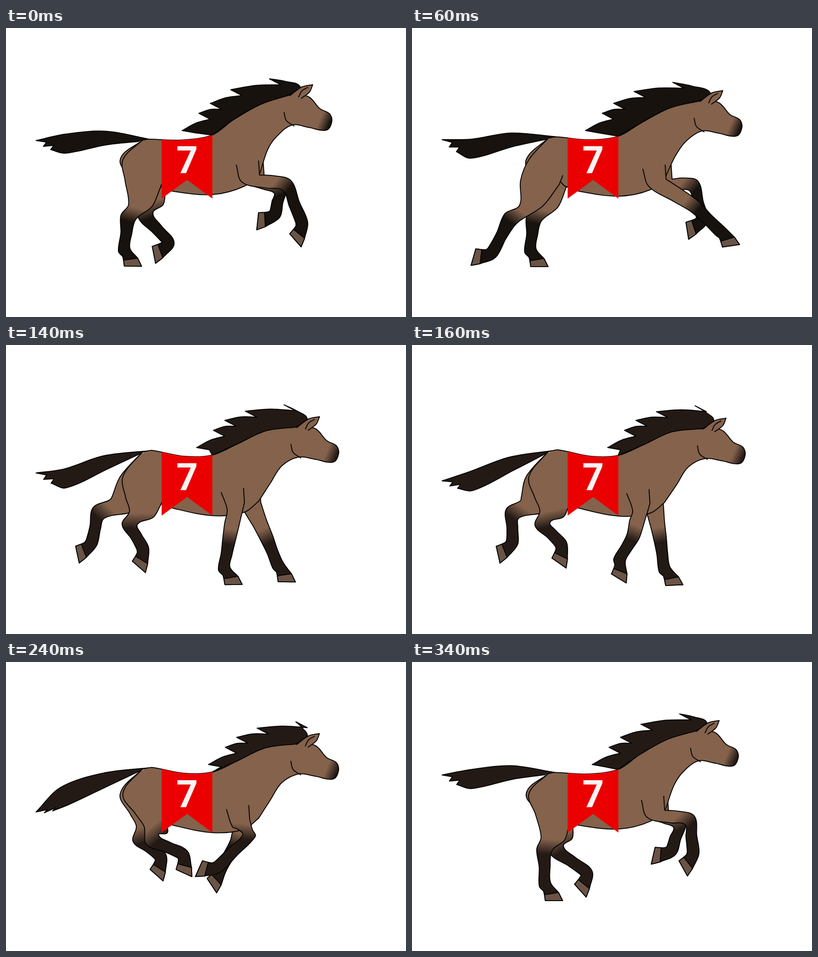
These frames come from a looping animation (879x637 px, 360 ms). An HTML page with a canvas:

```html
<!DOCTYPE html>
<html lang="en">
<head>
<meta charset="utf-8">
<title>Galloping horse</title>
<style>
  html, body { margin: 0; width: 100%; height: 100%; overflow: hidden; background: #fff; }
  canvas { display: block; }
</style>
</head>
<body>
<canvas id="stage" width="879" height="637"></canvas>
<script>
const ctx = document.getElementById('stage').getContext('2d');
const LOOP = 360, STEP = 20;
const COAT = '#84624c', HOOF = '#6a5446', LINE = '#050403';

// Key poses of the rig. Head: offset from rest. Tail: height of bend and tip.
// Legs: knee x, y, sole x, y and sole angle in degrees.
const poses = [
  { time: 0, head: [0, 0], tail: [255, 248],
    nearFore: [617, 347, 636, 468, 49], farFore: [602, 358, 553, 426, 96],
    nearHind: [269, 417, 279, 525, 1], farHind: [307, 413, 325, 500, 79] },
  { time: 60, head: [9, 13], tail: [266, 246],
    nearFore: [622, 394, 701, 480, -8], farFore: [619, 348, 605, 447, 81],
    nearHind: [218, 419, 135, 505, 106], farHind: [268, 421, 280, 526, 0] },
  { time: 100, head: [11, 23], tail: [274, 249],
    nearFore: [547, 425, 567, 522, 10], farFore: [604, 392, 655, 488, 1],
    nearHind: [247, 393, 217, 495, 84], farHind: [218, 398, 163, 508, 67] },
  { time: 140, head: [15, 33], tail: [294, 282],
    nearFore: [490, 430, 500, 528, -1], farFore: [574, 428, 617, 522, 1],
    nearHind: [272, 395, 292, 489, 41], farHind: [204, 370, 157, 462, 78] },
  { time: 200, head: [17, 39], tail: [305, 327],
    nearFore: [500, 399, 386, 480, 104], farFore: [495, 410, 494, 528, 1],
    nearHind: [313, 392, 371, 465, 33], farHind: [267, 384, 271, 475, 68] },
  { time: 280, head: [11, 23], tail: [280, 318],
    nearFore: [572, 368, 493, 440, 103], farFore: [535, 388, 441, 453, 111],
    nearHind: [321, 395, 389, 476, 15], farHind: [315, 397, 374, 468, 20] },
  { time: 340, head: [1, 4], tail: [258, 249],
    nearFore: [610, 349, 596, 455, 61], farFore: [588, 360, 530, 427, 103],
    nearHind: [291, 414, 312, 526, 0], farHind: [318, 414, 370, 504, 48] }
];

// Body outline at rest: x, y, share of the head's vertical and horizontal motion.
const BODY = [
  [300, 247, -.36, .2], [314, 245, -.38, .5], [385, 247, -.05, .5], [453, 236, .2, 0],
  [500, 202, .5], [560, 168, .65], [622, 148, 1], [664, 151, 1], [690, 178, 1],
  [711, 189, 1], [716, 206, 1], [704, 225, 1], [665, 219, 1], [628, 214, 1],
  [594, 240, .8], [575, 268, 1.1, .4], [558, 320, .75, -.2], [523, 349, .6, 0],
  [455, 367, .28, 0], [368, 360, 0], [335, 348, 0], [290, 300, 0]
];

const shift = (p, x, y) => [p[0] + x, p[1] + y];
const mix = (a, b, k) => [a[0] + (b[0] - a[0]) * k, a[1] + (b[1] - a[1]) * k];
const unit = (a, b) => {
  const x = b[0] - a[0], y = b[1] - a[1], length = Math.hypot(x, y) || 1;
  return [x / length, y / length];
};

// Two points either side of b, square to the bend a-b-c.
function across(a, b, c, half) {
  const [x, y] = unit([0, 0], shift(unit(a, b), ...unit(b, c)));
  return [shift(b, y * half, -x * half), shift(b, -y * half, x * half)];
}

// Cubic interpolation of one track through the looping key poses.
function sample(track, t) {
  const n = poses.length, k = poses.findLastIndex(p => p.time <= t);
  const keys = [-1, 0, 1, 2].map(d => poses[(k + d + n) % n][track]);
  const [ta, tb, tc, td] = [-1, 0, 1, 2].map(d => poses[(k + d + n) % n].time + Math.floor((k + d) / n) * LOOP);
  const span = tc - tb, u = (t - tb) / span;
  return keys[1].map((p, i) => {
    const [a, , c, d] = keys.map(key => key[i]);
    const m0 = (c - a) / (tc - ta) * span, m1 = (d - p) / (td - tb) * span;
    return p + u * (m0 + u * (3 * (c - p) - 2 * m0 - m1 + u * (2 * (p - c) + m0 + m1)));
  });
}

// Smooth open curve through points; corners keep straight tangents.
function curve(points, corners = [], from = 0, to = points.length - 1) {
  const path = new Path2D();
  const handle = (i, toward) => {
    const p = points[i], q = points[toward];
    const before = corners.includes(i) ? p : points[2 * i - toward] || p;
    const reach = Math.hypot(q[0] - p[0], q[1] - p[1]) / 3;
    const [x, y] = unit(before, q);
    return shift(p, x * reach, y * reach);
  };
  path.moveTo(...points[from]);
  for (let i = from; i < to; i++)
    path.bezierCurveTo(...handle(i, i + 1), ...handle(i + 1, i), ...points[i + 1]);
  return path;
}

function paint(path, fill) {
  ctx.fillStyle = fill;
  ctx.fill(path);
  ctx.stroke(path);
}

function fade(a, b, dark) {
  const g = ctx.createLinearGradient(...a, ...b);
  g.addColorStop(0, COAT);
  g.addColorStop(1, dark);
  return g;
}

// Upper limbs: where the leg meets the body follows the knee.
function shoulder(knee, drop, far) {
  const joint = [504 + (knee[0] - 490) * .26 + far * 14, 330 + drop * .7];
  return {
    joint, half: 14,
    front: [shift(joint, 18, -37), shift(joint, 20, -6)],
    back: [shift(joint, -18, 10), shift(joint, -31, -28)],
    middle: foot => across(joint, mix(joint, knee, .55), foot, 16)
  };
}

function haunch(knee, drop, far) {
  const swing = knee[0] - 270;
  const flank = [339 + swing * .3, 353 + swing * .15];
  return {
    joint: [300 + swing * .2, 340], half: 17,
    front: [shift(flank, 8, -20), flank],
    back: [[262 + swing * .45, 336], [257 - far * 6, 290], [300, 247 - drop * .36]],
    middle: (foot, kneeFront) => [shift(mix(flank, kneeFront, .5), 9, 6), [270 + swing * .65, knee[1] - 28]]
  };
}

function drawLeg([kx, ky, sx, sy, angle], limb, drop, far, dark) {
  const knee = [kx, ky], a = angle * Math.PI / 180;
  const c = Math.cos(a), s = Math.sin(a);
  const onFoot = (along, up) => [sx + along * c + up * s, sy + along * s - up * c];
  const fetlock = onFoot(-20, 36);
  const hoof = [onFoot(10, 18), onFoot(19, 0), onFoot(-19, 0), onFoot(-21, 13)];
  const top = limb(knee, drop, far);

  const [kneeFront, kneeBack] = across(top.joint, knee, fetlock, top.half);
  const [shinFront, shinBack] = across(knee, mix(knee, fetlock, .5), fetlock, 12);
  const [ankleFront, ankleBack] = across(knee, fetlock, onFoot(-5, 16), 13);
  const [upperFront, upperBack] = top.middle(fetlock, kneeFront);
  const outline = [
    ...top.front, upperFront, kneeFront, shinFront, ankleFront,
    ...hoof, onFoot(-23, 21), ankleBack, shinBack, kneeBack, upperBack, ...top.back
  ];
  const corners = [1, 6, 7, 8, 9, 10];

  const [x, y] = unit(kneeFront, kneeBack);
  ctx.fillStyle = fade(shift(knee, -y * 22, x * 22).map((v, i) => 2 * knee[i] - v),
                       shift(knee, y * 10, -x * 10).map((v, i) => v), dark);
  ctx.fillStyle = fade(shift(knee, -y * 24, x * 24), shift(knee, y * 9, -x * 9), dark);
  const path = curve(outline, corners);
  ctx.fill(path);
  ctx.fillStyle = dark;
  ctx.fill(curve(outline, corners, 4, 12));
  ctx.stroke(path);
  paint(curve([...hoof, hoof[0]], [0, 1, 2, 3, 4]), HOOF);
}

function drawTail(root, [bendY, tipY], dark) {
  const tip = [66, tipY], bend = [130, bendY];
  const start = [220, root[1] * .45 + bendY * .55 - 8];
  const [startLow, startTop] = across(root, start, bend, 15);
  const [bendLow, bendTop] = across(start, bend, tip, 21);
  const outline = [root, startTop, bendTop, tip];
  for (const k of [.25, .5])
    outline.push(shift(mix(tip, bendLow, k - .05), 10, -2), shift(mix(tip, bendLow, k), 0, 6));
  outline.push(bendLow, startLow, shift(root, -22, 5));
  paint(curve(outline, [3, 4, 5, 6, 7]), dark);
}

// Five locks sway back and forth; each ends in a point with a notch below it.
function drawMane(crest, ear, drop, t, dark) {
  const sway = 34 * Math.cos((t - 40) / LOOP * 2 * Math.PI);
  const outline = [...crest, shift(ear, -27, 6)], corners = [3];
  let notch = outline[4];
  [[605, 112], [520, 136], [475, 166], [450, 188], [413, 226]].forEach(([x, y], i) => {
    const tip = [x - sway, y + drop * Math.max(0, .6 - i * .3)];
    outline.push(shift(mix(notch, tip, .5), 0, -4), tip);
    notch = shift(tip, 25, 13);
    if (i === 4) notch = shift(tip, 28, 5);
    corners.push(outline.length - 1, outline.length);
    outline.push(notch);
  });
  paint(curve([...outline, crest[0]], corners), dark);
}

function drawFlag(body) {
  ctx.save();
  const area = new Path2D(body);
  area.rect(340, 300, 116, 80);
  ctx.clip(area);
  ctx.fillStyle = '#ea0000';
  ctx.fill(new Path2D('M342 200H453.5V376L398 335L342 376Z'));
  ctx.restore();
  ctx.fillStyle = '#f8f4f4';
  ctx.font = 'bold 83px Roboto, "Open Sans", sans-serif';
  ctx.textAlign = 'center';
  ctx.fillText('7', 398, 320);
}

function draw(t) {
  const dark = t < 80 ? '#17120e' : '#231a16';
  const [dx, dy] = sample('head', t);
  const body = BODY.map(([x, y, wy, wx = wy]) => [x + dx * wx, y + dy * wy]);
  const muzzle = body[10], throat = body[13], ear = [674 + dx, 125 + dy];
  const leg = (name, limb, far) => drawLeg(sample(name, t), limb, dy, far, dark);

  ctx.clearRect(0, 0, 879, 637);
  ctx.lineWidth = 2;
  ctx.lineJoin = ctx.lineCap = 'round';
  ctx.strokeStyle = LINE;

  leg('farHind', haunch, 1);
  leg('farFore', shoulder, 1);
  drawTail(body[1], sample('tail', t), dark);

  const bodyPath = curve(body, [16, 20]);
  paint(bodyPath, fade(shift(muzzle, -25, -6), shift(muzzle, -4, 3), dark));
  ctx.stroke(curve([[-17, -28], [-12, -10], [5, 2]].map(d => shift(throat, ...d))));
  drawMane(body.slice(3, 7), ear, dy, t, dark);

  paint(curve([[-50, 24], [-24, 5], [0, 0], [-7, 16], [-25, 30]].map(d => shift(ear, ...d)), [2]), COAT);
  ctx.stroke(curve([[-31, 27], [-24, 14], [-11, 6]].map(d => shift(ear, ...d))));

  leg('nearHind', haunch, 0);
  leg('nearFore', shoulder, 0);
  drawFlag(bodyPath);
}

const start = performance.now();
function tick() {
  const elapsed = Math.max(0, performance.now() - start);
  draw(Math.floor(elapsed % LOOP / STEP) * STEP);
  requestAnimationFrame(tick);
}
tick();
</script>
</body>
</html>
```
